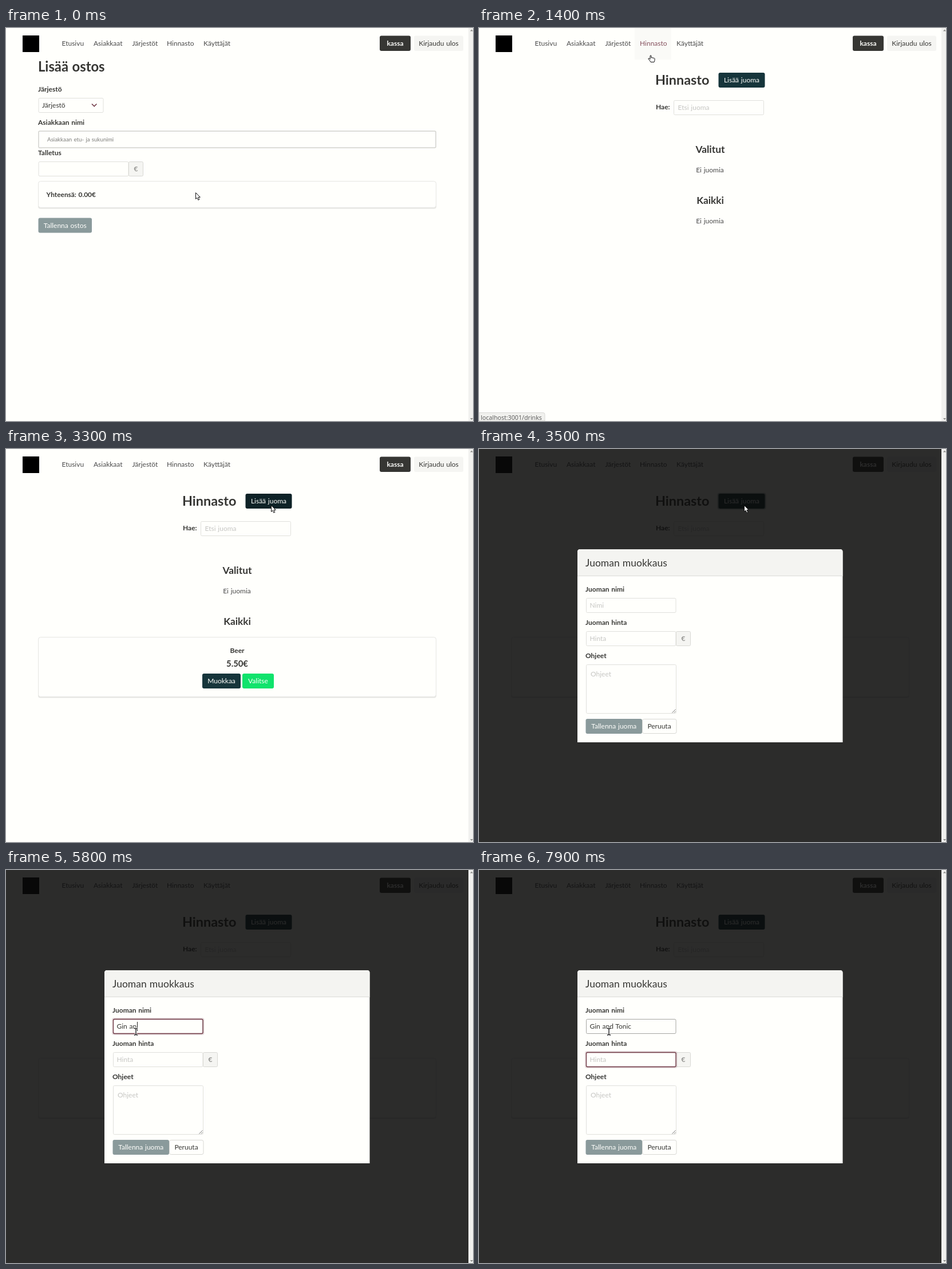
These frames come from a looping animation (816 by 686 pixels, 8 s). An HTML page:

```html
<!DOCTYPE html>
<html lang="fi">
<head>
<meta charset="utf-8">
<title>Hinnasto</title>
<style>
  html, body { margin: 0; width: 100%; height: 100%; overflow: hidden; background: #fffffc; }
  svg { display: block; width: 816px; height: 686px; }
  text { font-family: Lato, "Open Sans", sans-serif; font-size: 12px; word-spacing: .7px; fill: #4a4a4a; white-space: pre; }
  .bold { font-weight: 700; fill: #363633; }
</style>
</head>
<body>
<svg id="stage" viewBox="0 0 816 686" xmlns="http://www.w3.org/2000/svg"></svg>
<script>
const LOOP = 8000, TICK = 100;
const INK = '#363633', TEAL = '#16353b', MAROON = '#6c3340', LINE = '#e0e0dc', HOVER_LINE = '#a6a6a2', PALE = '#c6c6c3';

const text = (x, y, s, { size = 12, fill, bold, mid, id, font } = {}) =>
  `<text x="${x}" y="${y}"${id ? ` id="${id}"` : ''}${bold ? ' class="bold"' : ''}${mid ? ' text-anchor="middle"' : ''}
    style="font-size:${size}px;${fill ? `fill:${fill};` : ''}${font ? `font-family:${font}` : ''}">${s}</text>`;

const rect = (x, y, w, h, fill, r = 0, more = '') =>
  `<rect x="${x}" y="${y}" width="${w}" height="${h}" rx="${r}" fill="${fill}" ${more}/>`;

const field = (x, y, w, h, id = '') =>
  rect(x + .5, y + .5, w - 1, h - 1, '#fffffc', 2, `stroke="${LINE}" ${id && `id="${id}"`}`);

const button = (x, y, w, h, label, fill, { color = '#fffffc', bold, id } = {}) =>
  rect(x, y, w, h, fill, 3, id ? `id="${id}"` : '') +
  text(x + w / 2, y + h / 2 + 4.1, label, { fill: color, bold, mid: true });

const card = (y, h) =>
  rect(56, y + 1.5, 696, h, '#0a0a0a', 4, 'opacity=".1"') +
  rect(56.5, y + .5, 695, h - 1, '#fffffc', 4, 'stroke="#e6e6e3"');

const euro = (x, y) =>
  rect(x + .5, y + .5, 25, 25, '#f5f5f2', 2, 'stroke="#d8d8d4"') +
  text(x + 13, y + 16.7, '€', { mid: true, fill: '#7a7a77' });

const focusBox = (id, y) => `<g id="${id}">
  ${rect(186, y - 1, 159.5, 28, 'none', 3, `stroke="${MAROON}" stroke-width="2" opacity=".18"`)}
  ${rect(187.5, y + .5, 156.5, 25, 'none', 2, `stroke="${MAROON}" stroke-width="1.3"`)}</g>`;

const header = () => rect(29, 13, 29, 29, '#000') +
  rect(272, 0, 64, 55, '#fafaf7', 0, 'id="navHover"') +
  [[97.5, 'Etusivu'], [153, 'Asiakkaat'], [220.5, 'Järjestöt'], [281, 'Hinnasto', 'navPrices'], [345, 'Käyttäjät']]
    .map(([x, s, id]) => text(x, 31, s, { id })).join('') +
  button(653, 13.5, 54, 26.5, 'kassa', INK, { bold: true }) +
  button(713, 13.5, 86, 26.5, 'Kirjaudu ulos', '#f5f5f2', { color: INK });

const purchasePage = () =>
  text(56, 76, 'Lisää ostos', { size: 23.8, bold: true }) +
  text(56, 111, 'Järjestö', { bold: true }) +
  field(56.5, 122, 114, 26) + text(63, 138.5, 'Järjestö', { fill: INK }) +
  `<path d="M150 132.5l4.2 4.2 4.2-4.2" fill="none" stroke="${MAROON}" stroke-width="1.6"/>` +
  text(56, 169, 'Asiakkaan nimi', { bold: true }) +
  rect(57, 180, 694, 29, '#fffffc', 2, 'stroke="#d2d2ce" stroke-width="1.5"') +
  text(72, 198, 'Asiakkaan etu- ja sukunimi', { size: 9.8, fill: '#7c7c7a' }) +
  text(56, 222, 'Talletus', { bold: true }) +
  field(56.5, 233, 158, 26) + euro(214, 233) +
  card(267, 47) + text(70.5, 295, 'Yhteensä: 0.00€', { size: 11.9, bold: true }) +
  button(56.5, 331.5, 93.5, 26, 'Tallenna ostos', '#8a9a9b');

const drinksPage = () =>
  text(308, 99, 'Hinnasto', { size: 23.4, bold: true }) +
  rect(416.5, 76.5, 85, 29, TEAL, 4, 'id="addRing" opacity=".3"') +
  button(418.5, 78, 81, 26, 'Lisää juoma', TEAL, { id: 'addButton' }) +
  text(309, 142, 'Hae:', { bold: true }) +
  field(340, 126, 158, 26) + text(347.5, 143, 'Etsi juoma', { fill: PALE }) +
  text(404, 218, 'Valitut', { size: 17.4, bold: true, mid: true }) +
  text(403.5, 252, 'Ei juomia', { mid: true }) +
  text(404, 307, 'Kaikki', { size: 17.2, bold: true, mid: true }) +
  `<g id="noDrinks">${text(403.5, 341, 'Ei juomia', { mid: true })}</g>
  <g id="drinkCard">${card(328, 105) +
    text(404, 356, 'Beer', { bold: true, mid: true }) +
    text(404, 380, '5.50€', { size: 14.8, bold: true, mid: true }) +
    button(343, 392, 67, 26, 'Muokkaa', TEAL) +
    button(413, 392, 55, 26, 'Valitse', '#10e36c')}</g>`;

const panel = (bottom, fill) =>
  `<path d="M172 ${bottom}V179.5q0-4.5 4.5-4.5H631q4.5 0 4.5 4.5V${bottom}z" fill="${fill}"/>`;

const modal = () =>
  rect(0, 0, 808, 686, '#0a0a0a', 0, 'opacity=".86"') +
  panel(512, '#fffffc') + panel(222, '#f4f4f1') +
  rect(172, 221, 463.5, 1, '#dbdbd8') +
  text(186, 204.5, 'Juoman muokkaus', { size: 17.5, fill: INK }) +
  text(186, 249, 'Juoman nimi', { bold: true }) +
  field(187, 260, 157.5, 26, 'nameField') + focusBox('nameFocus', 260) +
  text(193.5, 277, '', { id: 'nameText' }) +
  text(186, 307, 'Juoman hinta', { bold: true }) +
  field(187, 318, 157.5, 26) + euro(344, 318) + focusBox('priceFocus', 318) +
  text(193.5, 334.7, 'Hinta', { fill: PALE }) +
  text(186, 365, 'Ohjeet', { bold: true }) +
  field(187, 376, 158, 86) + text(195, 397, 'Ohjeet', { fill: PALE }) +
  '<path d="M337.5 460.5l6-6M341 460.5l2.5-2.5" stroke="#777"/>' +
  button(186.5, 471, 98.5, 26, 'Tallenna juoma', '#8a9a9b') +
  rect(285.5, 471.5, 59.5, 25, '#fffffc', 3, 'stroke="#d8d8d4"') +
  text(315, 488, 'Peruuta', { mid: true, fill: INK }) +
  rect(194, 265, 1, 16, '#222', 0, 'id="caret"');

const status = () =>
  '<path d="M0 671.5H112q3 0 3 3V686H0z" fill="#f1f1ee" stroke="#d8d8d5"/>' +
  text(3, 683.5, 'localhost:3001/drinks', { size: 10.7, fill: '#555', font: "'Open Sans',sans-serif" });

const scrollbar = () => rect(808, 0, 8, 686, '#f1f1ef') +
  '<path d="M811 5.5h5l-2.5-3zM811 681h5l-2.5 3z" fill="#8a8a88"/>';

const BEAM = 'M-3 -5.5H-1.5L0 -4.5 1.5 -5.5H3M0 -4.5V5M-3 6H-1.5L0 5 1.5 6H3';
const pointers = () => `<g id="pointer" stroke="#111" stroke-linejoin="round" fill="#fff">
  <path id="arrow" d="M.5 .5V11.5L3 9.2 4.8 13.3 6.8 12.4 5 8.4H8.3z"/>
  <path id="hand" d="M-2.5 7.5L-5 4.6Q-5.5 3 -3.5 3.5L-2 5V-1Q-1 -2.5 0 -1V2.5Q1 1.6 2 2.7Q3.2 2 4 3.2Q5.500 2.6 6 4V7L5 10H-1z"/>
  <g id="ibeam" fill="none"><path d="${BEAM}" stroke="#fff" stroke-width="3"/><path d="${BEAM}" stroke-width="1.3"/></g></g>`;

document.getElementById('stage').innerHTML = rect(0, 0, 816, 686, '#fffffc') + header() +
  `<g id="purchase">${purchasePage()}</g><g id="drinks">${drinksPage()}</g>
  <g id="status">${status()}</g><g id="modal">${modal()}</g>` + scrollbar() + pointers();

const el = {};
document.querySelectorAll('[id]').forEach(node => el[node.id] = node);
const show = (id, on) => el[id].style.display = on ? '' : 'none';

// time, x, y
const path = [[0, 331, 287], [300, 331, 287], [400, 322, 247], [500, 322, 247], [1000, 301, 49.5],
  [1900, 301, 49.5], [2400, 466, 108], [2800, 466, 108], [3000, 463, 98], [3600, 463, 98],
  [4000, 240, 236], [4100, 240, 236], [4200, 227, 282], [LOOP, 227, 282]];
const typed = 'Gin and Tonic';
const keyTimes = [4800, 5000, 5200, 5300, 5600, 5800, 6000, 6100, 6400, 6600, 6700, 7000, 7000];

function pointerAt(t) {
  const i = path.findIndex((p, k) => k && t <= p[0]);
  const [a, b] = [path[i - 1], path[i]], k = (t - a[0]) / (b[0] - a[0]);
  return [a[1] + (b[1] - a[1]) * k, a[2] + (b[2] - a[2]) * k];
}

function render(time) {
  const t = Math.floor(time % LOOP / TICK) * TICK;
  const between = (from, to) => t >= from && t < to;

  const navHover = between(900, 2100);
  show('navHover', navHover);
  show('status', navHover);
  el.navPrices.style.fill = navHover ? '#85505d' : '';
  show('purchase', t < 1400);
  show('drinks', t >= 1400);
  show('noDrinks', t < 1500);
  show('drinkCard', t >= 1500);
  show('addRing', between(3500, 4000));
  el.addButton.setAttribute('fill', between(3200, 3500) ? '#0e2227' : between(2900, 3700) ? '#132f35' : TEAL);

  show('modal', t >= 3500);
  const count = keyTimes.filter(k => t >= k).length;
  el.nameText.textContent = count ? typed.slice(0, count) : 'Nimi';
  el.nameText.style.fill = count ? INK : PALE;
  el.nameField.setAttribute('stroke', t >= 4000 ? HOVER_LINE : LINE);
  show('nameFocus', between(4500, 7300));
  show('priceFocus', t >= 7300);
  show('caret', between(4500, 7900));
  if (t >= 3500) {
    const onName = t < 7300;
    const width = onName && count ? el.nameText.getComputedTextLength() : 0;
    el.caret.setAttribute('x', Math.round(194 + width));
    el.caret.setAttribute('y', onName ? 265 : 323);
  }

  const [x, y] = pointerAt(t);
  el.pointer.setAttribute('transform', `translate(${x} ${y})`);
  const beam = t >= 4200;
  show('hand', navHover);
  show('ibeam', beam);
  show('arrow', !navHover && !beam);
}

const start = performance.now();
function loop() {
  render(performance.now() - start);
  requestAnimationFrame(loop);
}
loop();
</script>
</body>
</html>
```
